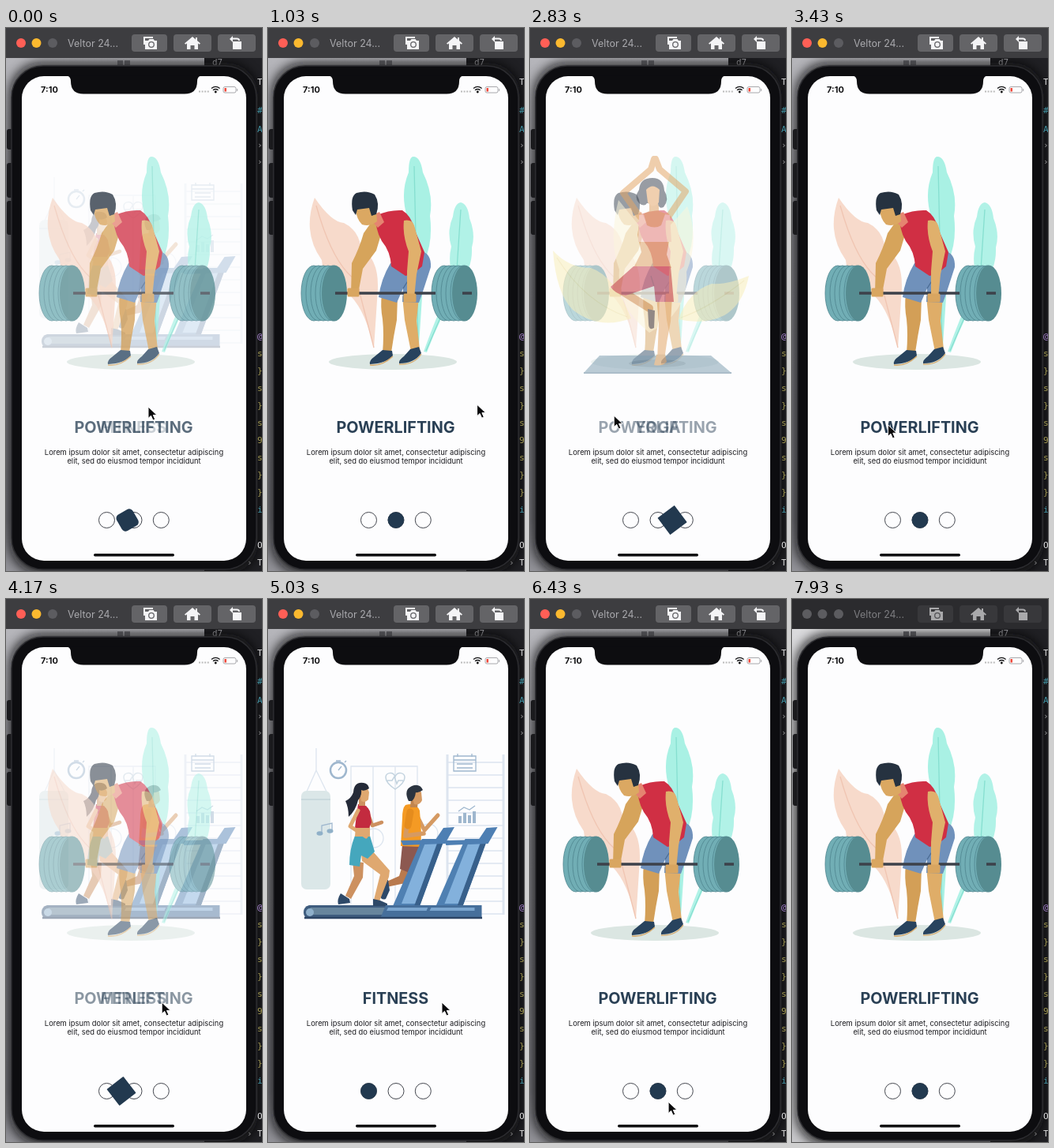
An HTML page that plays this animation: 324 by 688 pixels, repeating every 7960 ms.

```html
<!DOCTYPE html>
<html lang="en">
<head>
<meta charset="utf-8">
<title>Workout onboarding</title>
<style>
html, body { margin: 0; width: 100%; height: 100%; overflow: hidden; background: #1d1d20; }
svg { display: block; width: 100vw; height: 100vh; font-family: Inter, Roboto, sans-serif; }
.limb { fill: none; stroke-linecap: round; stroke-linejoin: round; }
.line { fill: none; stroke-width: 1.3; }
.title { font-size: 19.8px; font-weight: 700; fill: #2a4055; text-anchor: middle; }
.copy { font-size: 9.38px; fill: #1c1c20; text-anchor: middle; }
.code { font: 11px "DejaVu Sans Mono", monospace; }
.bar { fill: #3d3d40; }
.btn { fill: #646467; }
.icon { fill: #f4f4f6; stroke: none; }
.idle .bar { fill: #2b2b2e; }
.idle .btn { fill: #38383b; }
.idle .light { fill: #5c5c60; }
.idle .icon { opacity: .6; }
.idle .name { opacity: .65; }
</style>
</head>
<body>
<svg viewBox="0 0 324 688">
  <defs>
    <linearGradient id="desk" x2="0" y2="1">
      <stop stop-color="#b6b6bb"/><stop offset=".35" stop-color="#818187"/>
      <stop offset=".9" stop-color="#74747a"/><stop offset="1" stop-color="#929298"/>
    </linearGradient>
    <filter id="soft" x="-10%" width="120%"><feGaussianBlur stdDeviation="7"/></filter>
  </defs>

  <g id="window">
    <rect width="324" height="688" fill="#202024"/>
    <rect y="36" width="251" height="652" fill="url(#desk)"/>
    <rect id="glow" y="36" width="251" height="652" fill="#fff" opacity="0"/>
    <path d="M141 41h7v6h-7zM150 41h7v6h-7z" fill="#74747a"/>
    <text class="code" x="261" y="47" fill="#b0b0b6" font-size="13">d7</text>
    <rect x="5" y="44" width="314" height="648" rx="40" fill="#08080a" filter="url(#soft)" opacity=".85"/>
    <g id="code" class="code"></g>
    <rect class="bar" width="324" height="38"/>
    <circle class="light" cx="19" cy="19" r="6" fill="#ff5f56"/>
    <circle class="light" cx="38.500" cy="19" r="6" fill="#fbb92f"/>
    <circle cx="59" cy="19" r="6" fill="#5c5c60"/>
    <text class="name" x="78" y="24" font-size="12.500" fill="#a9a9ad">Veltor 24...</text>
    <rect class="btn" x="159" y="8" width="45" height="22" rx="4"/>
    <rect class="btn" x="212" y="8" width="48" height="22" rx="4"/>
    <rect class="btn" x="268" y="8" width="48" height="22" rx="4"/>
    <g class="icon">
      <path d="M174 11h12v2h-10v8h-2z"/>
      <path d="M176 16h4l1.500-2h5l1.500 2h3v11h-15z"/>
      <circle cx="184" cy="21" r="3.300" fill="none" stroke="#646467" stroke-width="1.300"/>
      <path d="M226 19.500 236 11l4 3.400V12h2v4.100l4 3.400-1.200 1.300-1.800-1.400V27h-4.500v-5h-5v5H229v-7.600l-1.800 1.400z"/>
      <path d="M287 17h11v10h-11z"/>
      <path d="M283 14l4-4v2.600h5q4 0 4 3.400h-2q0-1.400-2-1.400h-5V18z"/>
    </g>
  </g>

  <path d="M1 131q0-3 3-3h5v26H4q-3 0-3-3zM1 174q0-3 3-3h5v44H4q-3 0-3-3zM1 222q0-3 3-3h5v43H4q-3 0-3-3z" fill="#1a1a1d"/>
  <rect x="7" y="48" width="310" height="638" rx="40" fill="#0d0d10" stroke="#2c2c30" stroke-width="1.500"/>
  <rect x="20" y="61" width="284" height="614" rx="28" fill="#fdfdfe"/>
  <path d="M77 60.500q5 1 5 7 0 16 16 16H226q16 0 16-16 0-6 5-7z" fill="#0d0d10"/>

  <text x="44" y="82" font-size="11" font-weight="700" fill="#121214">7:10</text>
  <path d="M244 80.500h13" stroke="#bbb" stroke-width="2" stroke-dasharray="2 1.600"/>
  <path d="M260 76.500q5.300-4.400 10.600 0M262 78.800q3.300-2.600 6.600 0" class="line" stroke="#121214" stroke-width="1.600"/>
  <circle cx="265.300" cy="81" r="1.400"/>
  <rect x="275" y="74.500" width="16" height="7.500" rx="2" fill="none" stroke="#a8a8ac"/>
  <rect x="276.500" y="76" width="2.500" height="4.500" fill="#f04a3c"/>
  <path d="M292.700 77v3" stroke="#a8a8ac"/>

  <!-- Fitness -->
  <g class="page">
    <g class="line" stroke="#dde5ef" stroke-width="2">
      <path d="M105 386V212H189V386M133 212V386M161 212V386M61 189V217L49 244M61 217L74 244"/>
      <path d="M227 400V197M298 400V197" stroke-width="3"/>
      <path id="rungs"/>
      <circle cx="134" cy="303" r="12"/><circle cx="203" cy="297" r="12"/>
    </g>
    <rect x="42" y="243" width="37" height="125" rx="7" fill="#dbe7e8"/>
    <path d="M42 254h37" stroke="#c9d9dd" stroke-width="2"/>
    <g class="line" stroke="#9fb7ce" stroke-width="2">
      <circle cx="89" cy="217" r="10" stroke-width="2.500"/>
      <path d="M86 205h6M89 217l4-5M97 207l2-2"/>
      <path d="M161 241q-12-8-12-15c0-6 9-8 12-1 3-7 12-5 12 1q0 7-12 15zM151 230h6l3-5 3 9 2-4h6" stroke="#c3d3df" stroke-width="1.500"/>
      <path d="M235 199h28v19h-28zM235 204h28M240 196v4M258 196v4M239 209h20M239 214h20"/>
      <path d="M243 284v-9M249 284v-13M255 284v-10M261 284v-15" stroke-width="4"/>
      <path d="M241 269l7-5 7 3 7-5"/>
      <path d="M68 297V287l13-3v10"/>
    </g>
    <g fill="#8fb0c8"><ellipse cx="65.500" cy="297" rx="4" ry="2.800"/><ellipse cx="78.500" cy="294" rx="4" ry="2.800"/></g>

    <path d="M52 388H205v17H52q-7-1-7-8t7-9z" fill="#3e5c7e"/>
    <path d="M54 391H176v9H54q-4-4 0-9z" fill="#68869d"/>
    <circle cx="53" cy="397" r="5" fill="#8fb0cb"/>

    <path d="M170 338l16 6q-7 16-17 17l-19 4-2-6 18-8z" fill="#b97a4e"/>
    <path d="M178 338l14-2 11 14-9 34-6-1 4-31z" fill="#d59a63"/>
    <path d="M146 355l6 1 2 13-5 11q-6 2-7-4z" fill="#2e4968"/>
    <path d="M170 311h22l10 24-8 8-10-10-5 14-12-5z" fill="#8c5850"/>
    <path d="M190 277L198 293 215 274" class="limb" stroke="#d59a63" stroke-width="5"/>
    <path d="M174 261q13-4 18 7l2 29-1 17-25-1 2-36q0-12 4-16z" fill="#f49a24"/>
    <path d="M181 252h9l-1 12h-9z" fill="#c08550"/>
    <path d="M180 242q10-4 14 3l1 10q-3 7-10 5z" fill="#d59a63"/>
    <path d="M178 256q-7-14 4-19 10-4 14 5-5 4-9 3-1 8-5 11z" fill="#2b3440"/>
    <path d="M178 276L174 300 197 297" class="limb" stroke="#d59a63" stroke-width="5.500"/>
    <path d="M180 270l-3 17" class="limb" stroke="#e58c1d" stroke-width="9"/>

    <path d="M107 332l14 2-1 19-15 27-7-4 11-25z" fill="#cd9160"/>
    <path d="M118 322l14-3 22 25-1 8-12 31-7-2 8-32-23-17z" fill="#dfa870"/>
    <path d="M92 373l11 7 1 5-15 2q-2-6 3-14zM133 380l9 2 9 4v3h-18z" fill="#2e4968"/>
    <path d="M110 300h19l6 20-9 9-8-4-2 14-13-2q0-20 7-37z" fill="#45a7bd"/>
    <path d="M126 270L132 287 144 283" class="limb" stroke="#cd9160" stroke-width="4.500"/>
    <path d="M111 288h18v13h-19z" fill="#dfa870"/>
    <path d="M114 260q11-1 15 9l2 14-3 7H110l2-16z" fill="#c32b3f"/>
    <path d="M115 250h8v12h-8z" fill="#cd9160"/>
    <path d="M116 240q10-4 12 5l-1 9q-4 5-9 2z" fill="#dfa870"/>
    <path d="M114 255q-3 13-12 21 0-12-4-20 7-3 10-11 1-14 13-12 6 1 7 7-6 4-10 2 1 7-4 13z" fill="#242a38"/>
    <path d="M114 268L104 288 124 301" class="limb" stroke="#dfa870" stroke-width="5"/>

    <g id="tread">
      <path d="M195 304h28L192 389h-34z" fill="#4f80b2"/>
      <path d="M199 309h15l-27 77h-18z" fill="#83b1dc"/>
      <path d="M216 305h7L192 389h-7z" fill="#38608b"/>
      <path d="M168 306l44-1 10-15 14-1-12 21-53 2z" fill="#4e7fb3"/>
      <path d="M149 388h67v17h-74z" fill="#466f9b"/>
      <path d="M152 391h55v4h-57z" fill="#7ba6cf"/>
    </g>
    <use href="#tread" x="54.500"/>
    <path d="M46 404H271" stroke="#2d4565" stroke-width="2.500"/>
  </g>

  <!-- Powerlifting -->
  <g class="page">
    <ellipse cx="158" cy="423" rx="81" ry="10" fill="#dbe6e2"/>
    <path d="M59 215Q80 246 96 247 115 256 118 280 140 292 139 330L134 406Q124 360 105 340 70 324 68 294 43 259 59 215z" fill="#f7dacb"/>
    <path d="M61 225Q82 300 112 320L134 405" class="line" stroke="#f0c5b2"/>
    <path d="M184 163q9 0 12 20 14 28 9 55 4 33-7 57l-7 107h-5l1-103q-16-28-11-60-9-30 2-56 0-20 6-20z" fill="#a9f1e4"/>
    <path d="M244 221q9 2 11 20 8 20 3 37 1 26-14 43-26 45-43 90l-4-1q20-55 38-92-8-21-3-41-6-20 2-38 2-17 10-18z" fill="#b1f2e7"/>
    <path d="M185 175L190 400M244 230L238 321 200 409" class="line" stroke="#86dfd0"/>

    <path d="M144 337l20 3-1 30q-4 20-7 41l-11 1q2-24 0-43-3-16-1-32z" fill="#d39f57"/>
    <path d="M170 340l21 1-3 30 4 36-11 3-8-40z" fill="#dfad68"/>
    <path d="M145 408l12 1 1 6q-8 10-29 11-1-5 5-9zM180 407l11-3 3 8q-9 13-28 13-1-4 6-9z" fill="#28435e"/>
    <path d="M129 427q15 2 29-11M166 426q19 1 28-13" class="line" stroke="#d5a869" stroke-width="2"/>
    <path d="M155 298L192 282Q207 285 206 303L195 337 191 348 170 347 171 330 163 348 140 341Q143 318 155 298z" fill="#7091bb"/>
    <path d="M171 330L181 314" class="line" stroke="#4a6b92"/>
    <path d="M133 243l13 9-9 30-17 23-6 32-9-1 1-38q10-20 15-38z" fill="#d6a45b"/>
    <path d="M138 237Q154 230 170 231 182 238 187 259L198 284 195 302Q184 312 174 314L156 302Q155 283 144 270 134 252 138 237z" fill="#d02f44"/>
    <path d="M127 240L141 233 147 246 139 253z" fill="#e58470"/>
    <path d="M111 230Q125 222 137 230L138 245Q130 252 119 249 112 242 111 230z" fill="#dba862"/>
    <path d="M107 231Q104 213 112 209 125 205 135 211 142 222 137 236L131 238 128 228 113 230 111 237z" fill="#263240"/>

    <g id="plates">
      <g id="discs" fill="#71aeb5" stroke="#4f858f" stroke-width=".8"></g>
      <ellipse cx="84" cy="336" rx="16" ry="35.500" fill="#568c91"/>
    </g>
    <use href="#plates" x="165"/>
    <path d="M85 336H212M246 336H258" stroke="#3d414a" stroke-width="3.400"/>
    <path d="M172 244q10-2 13 6l9 33-6 29-3 30-9-1 0-33 2-25q-8-20-6-39z" fill="#e0b06c"/>
    <path d="M102 331h12v8h-12zM173 338h13v8h-13z" fill="#d9a660" stroke="#d9a660" stroke-width="3" stroke-linejoin="round"/>
  </g>

  <!-- Yoga -->
  <g class="page">
    <path d="M29 282Q49 304 77 304 107 314 128 368 87 383 54 357 33 336 29 282zM277 314Q248 326 230 324 200 334 188 369 220 377 246 364 270 350 277 314z" fill="#f9eeba"/>
    <path d="M112 218Q99 270 113 306 109 353 151 386 202 360 198 309 215 267 199 226 171 259 154 270z" fill="#fcf6dc"/>
    <path d="M34 291Q70 348 123 366M271 320Q228 354 191 367" class="line" stroke="#eddf9c"/>
    <path d="M88 415H229L255 437H68z" fill="#7f9fb2"/>
    <path d="M68 437H255" stroke="#64859c" stroke-width="2"/>
    <ellipse cx="161" cy="425" rx="36" ry="5" fill="#67859a"/>
    <g class="limb" stroke="#e3a565">
      <path d="M139 239L118 209 153 179 157 166" stroke-width="8"/>
      <path d="M176 238L197 207 164 179 159 166" stroke-width="8"/>
      <path d="M111 330L151 355" stroke="#d19255" stroke-width="10"/>
    </g>
    <path d="M160 340h20l-2 32q-5 24-8 48l-9 1 2-47z" fill="#e3a565"/>
    <path d="M160 414h11l2 9q-6 6-16 4z" fill="#d7985a"/>
    <path d="M149 356l9 2-1 22q-7 4-7-6z" fill="#454a60"/>
    <path d="M140 237L151 232V220H163V232L177 237 176 270 173 287 179 304H131L141 284 136 262z" fill="#dd9f60"/>
    <path d="M138 237l6-1 4 14q10 5 18 0l5-14 6 1 2 34H137z" fill="#f5d0c4"/>
    <path d="M138 222Q131 215 138 205 139 190 155 190 169 190 170 206 177 217 169 227 163 230 162 222H148Q145 227 138 222z" fill="#404854"/>
    <path d="M147 205Q155 196 164 205L163 221Q155 230 149 221z" fill="#e5a86a"/>
    <path d="M131 302H178L182 347H159L157 327 121 339Q108 337 102 328z" fill="#c63c4c"/>
    <path d="M157 327l-4-13" class="line" stroke="#9c303d"/>
  </g>

  <text class="title" x="161.500" y="513">FITNESS</text>
  <text class="title" x="161.500" y="513">POWERLIFTING</text>
  <text class="title" x="161.500" y="513">YOGA</text>
  <text class="copy" x="162" y="541">Lorem ipsum dolor sit amet, consectetur adipiscing</text>
  <text class="copy" x="162" y="552">elit, sed do eiusmod tempor incididunt</text>

  <g fill="none" stroke="#41444c">
    <circle cx="127.500" cy="623.500" r="10"/>
    <circle cx="162" cy="623.500" r="10"/>
    <circle cx="196.300" cy="623.500" r="10"/>
  </g>
  <rect id="dot" fill="#22394f"/>
  <rect x="111" y="666" width="102" height="3.400" rx="1.700" fill="#0c0c0e"/>
  <path id="cursor" d="M0 0V14.500L3.500 11.300 6 17 8.700 15.800 6.300 10.400H11z" fill="#08080a" stroke="#fdfdfe"/>
</svg>

<script>
const LOOP = 7960, IDLE_AT = 7050;
const $ = id => document.getElementById(id);
const pages = document.querySelectorAll('.page');
const titles = document.querySelectorAll('.title');

// [ms, page]
const scroll = [[0, .76], [400, 1], [1200, 1], [1630, 1.65], [2000, 2], [2450, 2], [2830, 1.53],
  [3200, 1], [3700, 1], [4170, .54], [4600, 0], [5650, 0], [6200, 1], [LOOP, 1]];
// [ms, x, y]
const mouse = [[0, 180, 480], [300, 132, 478], [1130, 270, 477], [1630, 97, 475], [1900, 60, 477],
  [2450, 45, 487], [2830, 106, 491], [3150, 205, 498], [3650, 64, 506], [4170, 197, 511],
  [4450, 220, 511], [5250, 220, 511], [5650, 262, 520], [6000, 112, 548], [6430, 175, 637], [IDLE_AT, 200, 690]];

// Smooth curve through the keys that rests at turning points.
function track(keys, t, col) {
  const i = keys.findIndex(k => k[0] > t);
  if (i < 0) return keys.at(-1)[col];
  const slope = j => {
    const l = keys[j - 1], m = keys[j], r = keys[j + 1];
    if (!l || !r || (m[col] - l[col]) * (r[col] - m[col]) <= 0) return 0;
    return (r[col] - l[col]) / (r[0] - l[0]);
  };
  const a = keys[i - 1], b = keys[i], d = b[0] - a[0];
  const u = (t - a[0]) / d, v = 1 - u;
  return a[col] * v * v * (1 + 2 * u) + b[col] * u * u * (3 - 2 * u)
    + d * u * v * (v * slope(i - 1) - u * slope(i));
}

function build() {
  let rungs = '';
  for (let y = 207; y < 400; y += 16) rungs += `M227 ${y}H298`;
  $('rungs').setAttribute('d', rungs);

  for (let x = 58; x < 84; x += 6)
    $('discs').innerHTML += `<ellipse cx="${x}" cy="336" rx="16" ry="35"/>`;

  const glyphs = [['T', 72, '#ddd'], ['#', 108, '#4397a7'], ['A', 132, '#4397a7'], ['›', 152, '#999'], ['›', 173, '#999'],
    ['@', 394, '#a884d0'], ['O', 659, '#ddd'], ['T', 681, '#ddd']];
  [...'s}s}s9s}}i'].forEach((c, i) => glyphs.push([c, 416 + i * 22, c == 'i' ? '#4397a7' : '#a39a52']));
  $('code').innerHTML = glyphs.map(([c, y, color]) => `<text x="318" y="${y}" fill="${color}">${c}</text>`).join('')
    + '<text x="305" y="681" fill="#888">›</text>';
}

function drawDot(p) {
  const u = p % 1, round = Math.abs(2 * u - 1);
  const size = 27 - 6.5 * round, turn = -Math.min(70 * u, 125 * (1 - u));
  const attrs = {
    x: -size / 2, y: -size / 2, width: size, height: size, rx: 10.25 * round,
    transform: `translate(${127.5 + 34.4 * p} 623.5) rotate(${turn})`
  };
  for (const k in attrs) $('dot').setAttribute(k, attrs[k]);
}

function frame(now) {
  const t = Math.max(0, now - start) % LOOP, p = track(scroll, t, 1), idle = t >= IDLE_AT;
  [pages, titles].forEach(list => list.forEach((el, i) => {
    el.style.opacity = Math.max(0, 1 - Math.abs(p - i));
  }));
  drawDot(p);
  $('window').setAttribute('class', idle ? 'idle' : '');
  $('glow').setAttribute('opacity', idle ? .5 : 0);
  $('cursor').style.display = idle ? 'none' : '';
  $('cursor').setAttribute('transform', `translate(${track(mouse, t, 1)} ${track(mouse, t, 2)})`);
  requestAnimationFrame(frame);
}

build();
const start = performance.now();
requestAnimationFrame(frame);
</script>
</body>
</html>
```
